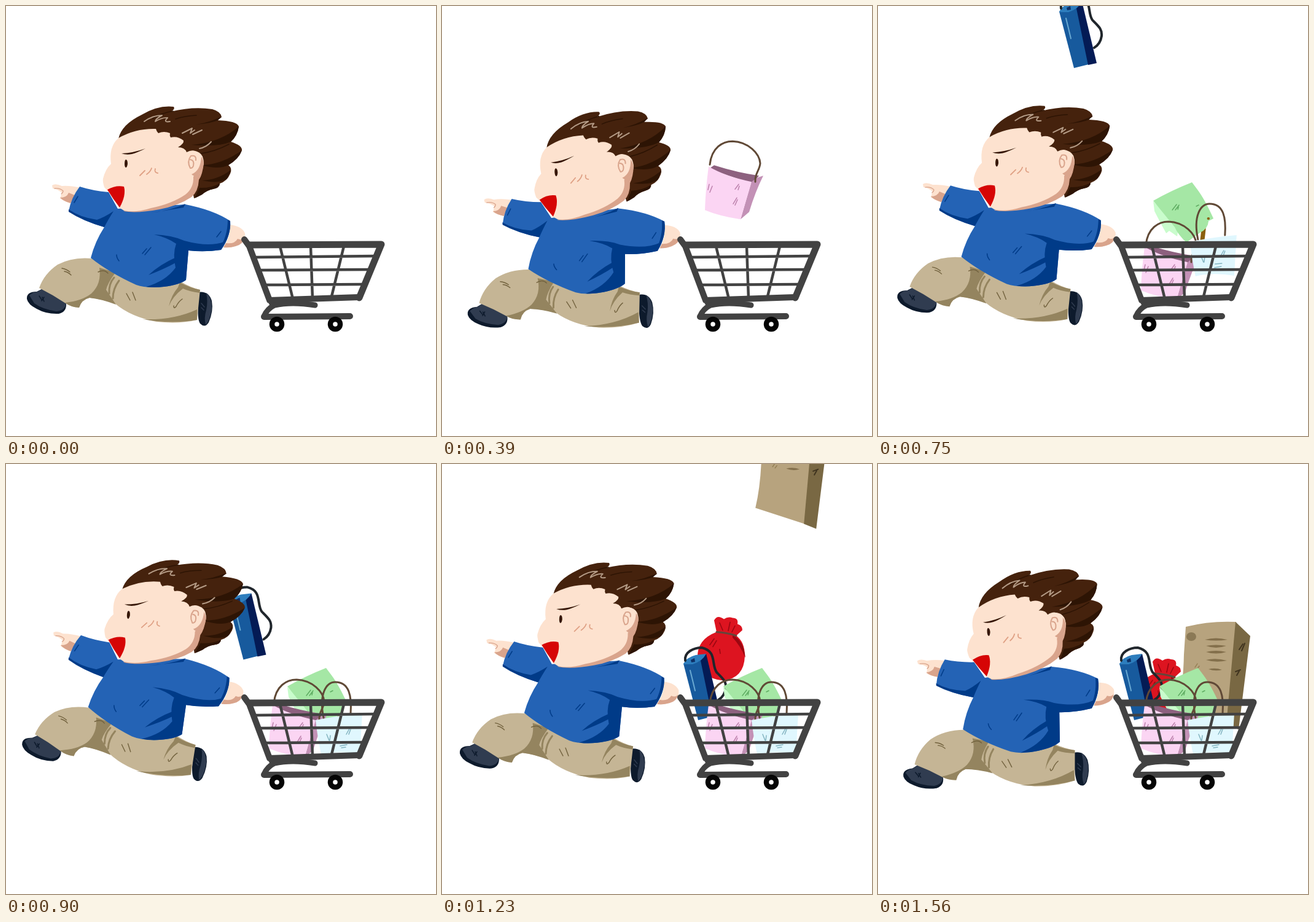
These frames come from a looping animation (700 px wide and 700 px high, 1.89 s). An HTML page with a canvas:

```html
<!DOCTYPE html>
<html lang="en">
<head>
<meta charset="utf-8">
<title>Shopping run</title>
<style>
html, body { margin: 0; width: 100%; height: 100%; overflow: hidden; background: #fff; }
canvas { display: block; width: 100vw; height: 100vh; }
</style>
</head>
<body>
<canvas id="stage" width="700" height="700"></canvas>
<script>
const ctx = document.getElementById('stage').getContext('2d');
const LOOP = 1890, STEP = 30, LAST = 1560;

const fill = (color, d) => ({ color, path: new Path2D(d) });
const line = (color, width, d) => ({ color, width, path: new Path2D(d) });

const SKIN = '#fde2cf', SKIN_SHADE = '#d9a48c', HAIR = '#45220d', HAIR_DARK = '#2d1404';
const BLUE = '#2463b5', NAVY = '#003b88', KHAKI = '#c5b595', OLIVE = '#94845f';
const SHOE = '#303c50', SOLE = '#0d1a2c', STEEL = '#424242', CORD = '#604936';

const shoes = [
  fill(SOLE, 'M34 477Q33 465 50 465L60 460L98 484Q99 498 86 501Q66 502 50 493Q36 486 34 477Z'),
  fill(SHOE, 'M38 471Q44 465 52 465L60 460L98 484Q96 496 82 497Q60 494 46 484Z'),
  line(SOLE, 1.5, 'M54 472L58 478M59 474L62 481M62 474L58 480'),
  fill(SOLE, 'M312 466Q330 463 335 480Q338 497 330 515Q324 525 316 517Q311 510 313 480Z'),
  fill(SHOE, 'M326 467Q334 473 335 490Q333 511 325 519Q322 508 326 495Q329 480 326 467Z'),
  line(SHOE, 1.5, 'M318 484L323 490M318 491L322 495')
];

const trousers = [
  fill(KHAKI, 'M140 411Q108 408 84 421Q62 436 54 459Q76 470 97 484Q106 490 119 491Q123 478 136 475Q156 477 177 484Q203 506 245 514Q282 518 311 511L316 462Q300 458 285 449L210 440Z'),
  fill(OLIVE, 'M96 483Q124 480 139 468Q156 452 152 426L178 434Q165 452 163 462Q171 474 179 486Q155 477 136 475Q123 478 119 491Q105 490 96 483Z'),
  fill(OLIVE, 'M222 510Q272 512 311 494L311 511Q270 518 222 510Z'),
  fill(OLIVE, 'M283 450Q300 459 316 462L315 467Q299 465 288 460Q271 473 265 489Q269 471 280 458Z'),
  line(OLIVE, 3, 'M176 442Q167 452 168 468M184 447Q174 460 174 476'),
  line('#72623e', 1.4, 'M91 427Q98 428 104 433M95 432Q101 433 106 438M196 468L202 479M206 466L211 479M273 488Q273 494 277 489Q281 481 287 477M150 433Q160 428 166 435')
];

const sweater = [
  fill(BLUE, 'M120 294Q142 301 167 303L182 330L292 323Q338 332 365 350Q366 376 350 397Q324 401 297 398L293 446Q282 454 257 457Q229 460 212 454Q168 434 138 410Q145 383 160 360Q126 350 102 334Q106 312 120 294Z'),
  fill(NAVY, 'M102 331Q120 344 148 348Q160 344 175 334Q165 350 160 360Q125 350 102 335Z'),
  fill(NAVY, 'M241 372Q270 373 290 382Q330 393 355 384L350 397Q323 401 297 398L293 446Q282 454 257 457Q242 459 228 457Q260 448 276 426Q271 404 277 387Q263 377 241 372Z'),
  fill(NAVY, 'M234 337Q268 333 292 322L289 328Q260 333 234 337Z'),
  fill(NAVY, 'M365 350Q367 373 350 397L346 397Q361 376 361 348Z'),
  fill(NAVY, 'M277 409Q250 421 232 438Q258 428 276 418Z'),
  line(NAVY, 1.5, 'M180 405Q180 410 184 415M222 403L229 395M226 405L236 393M111 320L117 310M350 367L343 376')
];

const hands = [
  fill(SKIN, 'M75 292Q80 288 91 293Q104 292 121 296L106 321Q94 318 88 313L91 304Q84 298 76 297Z'),
  fill(SKIN_SHADE, 'M88 312Q99 312 102 304L112 308L105 321Q94 318 88 312Z'),
  line(SKIN_SHADE, 1.3, 'M79 297Q88 296 93 301Q93 304 90 306'),
  fill(SKIN, 'M364 356Q384 358 389 370Q390 384 378 389Q367 394 354 392Q366 376 364 356Z'),
  fill(SKIN_SHADE, 'M358 386Q372 388 377 379Q384 382 388 377Q386 388 374 391Q365 394 354 393Z')
];

const hair = [
  fill(HAIR, 'M183 216Q188 193 221 177Q248 161 273 164Q276 168 268 172Q305 163 336 168Q350 172 351 181L344 186Q376 187 379 196Q377 211 366 221Q385 227 384 235Q379 249 362 259Q369 264 365 273Q360 285 348 289Q348 296 337 298Q327 300 319 307Q312 311 306 313L292 240Z'),
  fill(HAIR_DARK, 'M379 196Q350 222 302 226Q345 230 366 221Q377 211 379 196Z'),
  fill(HAIR_DARK, 'M384 235Q352 258 318 259Q346 267 362 259Q379 249 384 235Z'),
  fill(HAIR_DARK, 'M366 267Q345 283 319 284Q348 290 360 281Z'),
  fill(HAIR_DARK, 'M348 289Q332 297 315 296L307 313Q313 310 319 307Q327 300 337 298Q348 296 348 289Z'),
  fill(HAIR_DARK, 'M351 180Q330 190 309 193Q334 191 345 186Z'),
  line(HAIR_DARK, 1.5, 'M272 171Q254 174 239 183M310 178Q290 179 276 184M363 225Q340 237 318 240'),
  line('#b49b86', 2, 'M225 188Q239 178 254 178Q243 184 243 188Q255 181 263 182Q255 190 267 188M287 207L303 199L300 207L307 202M304 209L319 202M315 232Q326 230 334 221')
];

const head = [
  fill(SKIN_SHADE, 'M306 236Q319 238 322 255Q320 275 314 283Q313 302 302 311Q281 325 250 331Q213 338 191 334L230 320Z'),
  fill(SKIN, 'M183 215Q211 199 244 200Q245 204 248 207Q257 203 267 207Q266 211 268 214Q279 211 289 219Q290 224 280 230Q291 230 294 238Q305 232 313 239Q317 245 313 259Q309 273 305 278Q306 296 292 307Q270 322 236 329Q211 337 192 333L184 328L172 308L160 295Q157 285 158 281Q162 265 171 257Q167 229 183 215Z'),
  fill(SKIN, 'M301 237Q314 234 320 245Q325 257 316 272Q307 281 298 269Q291 248 301 237Z'),
  fill(SKIN_SHADE, 'M318 245Q326 258 316 272Q309 281 302 274Q317 268 318 245Z'),
  line(SKIN_SHADE, 2, 'M300 264Q294 253 301 244Q310 242 309 251M300 250Q307 251 305 260Q304 264 300 264'),
  fill('#d60505', 'M165 299Q179 291 192 294Q196 308 185 328Q174 314 165 299Z'),
  fill('#351607', 'M188 240Q208 239 227 232Q213 239 205 241Q196 243 188 240Z'),
  fill('#351607', 'M195 250Q198 250 198 257Q197 263 195 263Q193 262 193 257Q193 251 195 250Z'),
  line('#dfa084', 1.8, 'M218 276L226 268M229 274Q235 270 237 264M243 265Q241 271 247 272')
];

const runner = [shoes, trousers, hands, sweater, hair, head].flat();

const cart = [
  line(STEEL, 4.5, 'M404 409L603 407M413 430L593 429M421 454L583 453M446 391L467 477M496 391L499 477M550 391L529 477'),
  line(STEEL, 11, 'M397 389L611 388L575 475'),
  line(STEEL, 10, 'M388 380L396 391L429 479L575 474M430 478L435 487M420 506L560 505'),
  line(STEEL, 9, 'M420 505Q425 493 437 487Q465 481 503 487'),
  line('#050505', 8.5, 'M449 518A8 8 0 1 1 433 518A8 8 0 1 1 449 518ZM544 518A8 8 0 1 1 528 518A8 8 0 1 1 544 518Z')
];

const carton = [
  fill('#b7a37e', 'M501 265Q540 255 583 257L568 424L488 398Q497 360 498 310Z'),
  fill('#796843', 'M582 257L606 280L587 432L567 424Z'),
  fill('#8b7956', 'M518 281A8 7 0 1 1 502 281A8 7 0 1 1 518 281Z'),
  fill('#836f4b', 'M532 286Q550 281 569 286Q550 289 532 286ZM534 296Q550 293 567 296Q550 302 534 296ZM534 306Q550 302 567 306Q550 311 534 306ZM534 319Q550 315 568 320Q550 324 534 319ZM538 334Q549 331 560 335Q549 338 538 334Z'),
  line('#40341f', 2, 'M588 302L594 293M592 304L597 292M582 338L590 335M584 344L588 337'),
  line('#8f7a4e', 1.3, 'M516 331L520 325M520 333L523 329')
];

const pouch = [
  fill('#dd1420', 'M451 341Q419 353 420 383Q427 418 462 420Q496 416 497 380Q497 357 483 347L493 338Q493 330 485 328Q487 318 477 318Q470 315 463 320Q452 312 447 322Z'),
  fill('#9b0711', 'M477 346Q495 354 498 383Q489 362 477 350Z'),
  line('#9b0711', 1.6, 'M456 326L461 338M473 325L470 339M481 331L476 341M440 362L447 352M445 365L451 355M456 369L457 376'),
  line('#65453a', 3, 'M451 341Q468 342 483 347')
];

const flask = [
  fill('#175a9d', 'M393 325Q407 311 429 310L441 411L417 417Z'),
  fill('#041b55', 'M421 320L430 309L454 409L440 412Z'),
  fill('#2d7dbd', 'M393 326Q397 315 413 311L430 309Q424 321 408 326Z'),
  fill('#0d2f66', 'M405 319L411 316L412 322L406 323Z'),
  line('#69a9d2', 2, 'M404 336Q408 352 412 369'),
  line('#20262c', 4, 'M396 320C394 306 410 299 423 299C448 305 438 326 447 339C458 350 463 354 462 365Q460 378 450 384')
];

const box = [
  line('#8a600d', 7, 'M540 408L538 425'),
  fill('#c9fccc', 'M458 363L499 404L497 420L484 411L479 415Q466 391 460 379Z'),
  fill('#a5e7a5', 'M458 362Q488 345 521 332L530 344Q542 360 556 391L548 395Q547 408 534 414L512 430Q498 417 493 405Z'),
  line('#5fad62', 1.5, 'M489 377L496 368M494 377L500 369M498 376L499 372M528 371L532 369'),
  line('#8a600d', 4, 'M547.5 391L548 391')
];

const pinkBag = [
  fill('#8d617f', 'M443 390Q481 402 516 407L505 420L434 396Z'),
  fill('#c391b6', 'M523 407Q508 411 503 419L486 478L500 466Q510 433 523 407Z'),
  fill('#fbd5f3', 'M434 392Q461 408 504 417L486 478Q452 473 428 463Q429 430 434 392Z'),
  line('#bd82ad', 1.5, 'M433 430L435 421M436 434L440 424M474 453L480 443M477 455L481 446M477 429L483 421M482 430L484 424'),
  line(CORD, 3, 'M436 389C439 361 457 351 473 351C499 352 517 371 518 387C517 399 509 403 510 417')
];

const blueBag = [
  fill('#e0f7fe', 'M504 417Q542 409 580 406L576 472Q541 466 513 473Q507 444 504 417Z'),
  line('#83b4c0', 1.5, 'M522 440L526 450M528 442L527 450M554 440L559 431M558 440L561 432M545 453L556 452M544 459L555 457M546 462L553 461'),
  line(CORD, 3, 'M517 413C509 375 521 355 536 355C559 355 563 378 561 406')
];

// Listed back to front; drift is the sideways travel per pixel still to fall.
const items = [
  { art: carton, land: 1502, speed: 1.2, drift: 0.068 },
  { art: pouch, land: 1275, speed: 1.5, drift: -0.06 },
  { art: flask, land: 968, speed: 1.45, drift: -0.31 },
  { art: box, land: 775, speed: 1.8, drift: -0.22 },
  { art: pinkBag, land: 510, speed: 1.09, drift: 0 },
  { art: blueBag, land: 772, speed: 1.5, drift: 0.116 }
];

// [time, lean in radians]
const sway = [[0, 0], [467, -0.093], [1005, 0.09], [1560, -0.1]];

function leanAt(t) {
  let i = 1;
  while (t > sway[i][0]) i++;
  const [t0, a] = sway[i - 1], [t1, b] = sway[i];
  return a + (b - a) * (t - t0) / (t1 - t0);
}

function paint(shapes) {
  for (const { color, width, path } of shapes) {
    if (width) {
      ctx.strokeStyle = color;
      ctx.lineWidth = width;
      ctx.stroke(path);
    } else {
      ctx.fillStyle = color;
      ctx.fill(path);
    }
  }
}

function draw(t) {
  ctx.fillStyle = '#fff';
  ctx.fillRect(0, 0, 700, 700);
  ctx.lineCap = ctx.lineJoin = 'round';

  for (const { art, land, speed, drift } of items) {
    const height = Math.max(0, land - t) * speed;
    ctx.save();
    ctx.translate(height * drift, -height);
    paint(art);
    ctx.restore();
  }

  // The runner swings rigidly about the hand on the cart, which creeps up and left.
  ctx.save();
  ctx.translate(380 - t * 0.003, 373 - t * 0.0013);
  ctx.rotate(leanAt(t));
  ctx.translate(-380, -373);
  paint(runner);
  ctx.restore();

  paint(cart);
}

const start = performance.now();
function tick() {
  const t = (performance.now() - start) % LOOP;
  draw(Math.min(LAST, Math.floor(t / STEP) * STEP));
  requestAnimationFrame(tick);
}
tick();
</script>
</body>
</html>
```
